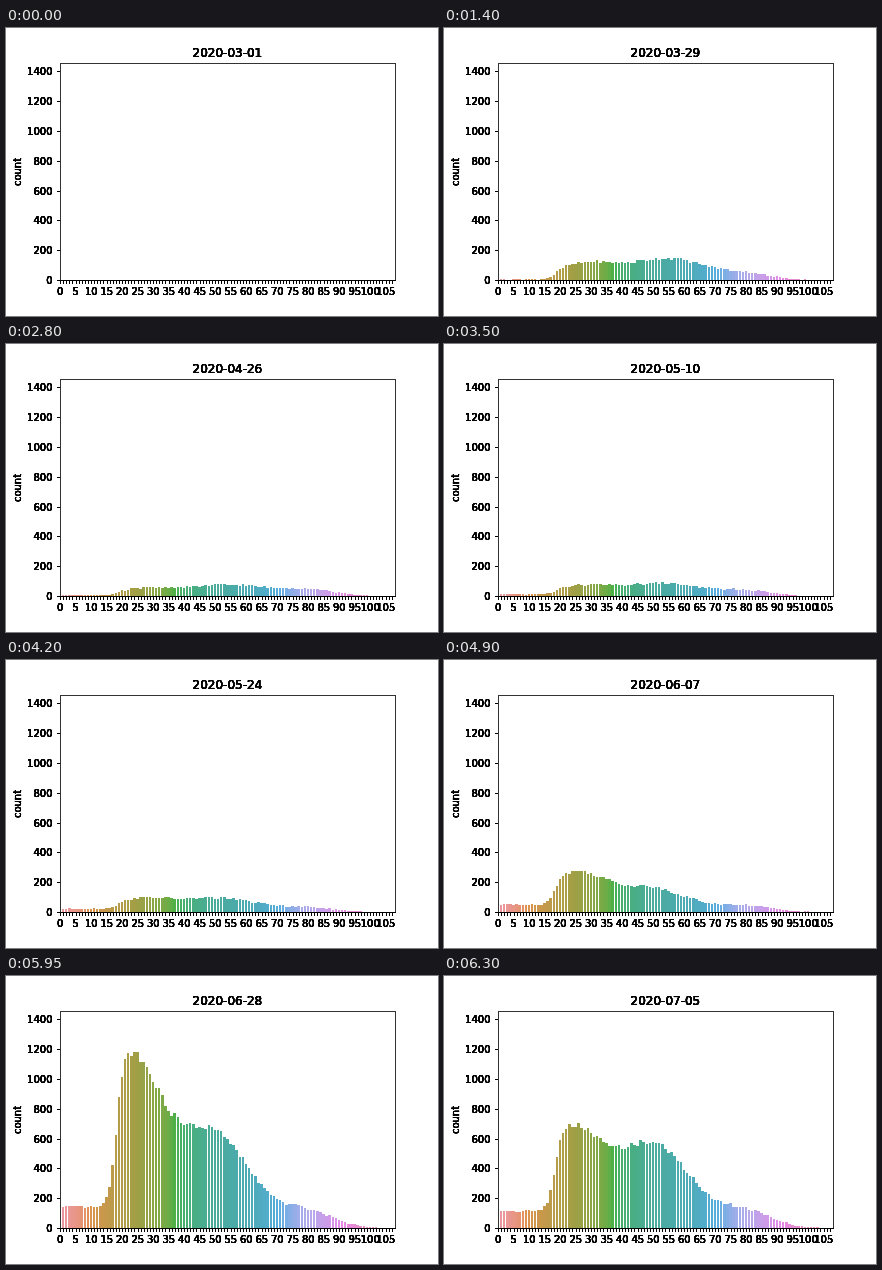
Write an HTML page that moves like this. It is 432 by 288 pixels and loops after 6.65 s.

```html
<!DOCTYPE html>
<html lang="en">
<head>
<meta charset="utf-8">
<title>Weekly count by age</title>
<style>
  html, body { margin: 0; width: 100%; height: 100%; overflow: hidden; background: #fff; }
  svg { display: block; width: 432px; height: 288px; }
  text {
    font: 10px "DejaVu Sans", sans-serif;
    text-anchor: middle;
    text-shadow: 0 0 #000, 0 0 #000, 0 0 #000, 0 0 #000;
    stroke: #000;
    stroke-width: .15px;
  }
  #title { font-size: 12px; }
  .right { text-anchor: end; }
</style>
</head>
<body>
<svg viewBox="0 0 432 288">
  <g id="bars" shape-rendering="crispEdges"></g>
  <g id="axes" shape-rendering="crispEdges"></g>
  <g id="labels">
    <text id="title" x="221.4" y="29"></text>
    <text transform="translate(15 144) rotate(-90)">count</text>
  </g>
</svg>
<script>
const STEP = 350, WEEKS = 19, AGES = 108;
const LEFT = 54, RIGHT = 388.8, TOP = 34.56, BASE = 252, Y_MAX = 1459;
const PITCH = (RIGHT - LEFT) / AGES;
const $ = id => document.getElementById(id);
const xOf = age => LEFT + age * PITCH;
const yOf = count => BASE - Math.min(count, Y_MAX) * (BASE - TOP) / Y_MAX;
const mix = (a, b, t) => a + (b - a) * t;
const bump = (x, center, width) => Math.exp(-(((x - center) / width) ** 2));
const rise = (x, center, width) => 1 / (1 + Math.exp((center - x) / width));

function add(parent, tag, attrs, text = '') {
  const el = document.createElementNS('http://www.w3.org/2000/svg', tag);
  for (const key in attrs) el.setAttribute(key, attrs[key]);
  el.textContent = text;
  return parent.appendChild(el);
}

// Key weeks: size of each age group, and where the two main groups peak
const keys = [
  { week: 0, kids: 5, young: 122, youngAge: 28, mid: 160, midAge: 55, old: 42 },
  { week: 4, kids: 5, young: 122, youngAge: 28, mid: 160, midAge: 55, old: 42 },
  { week: 8, kids: 7, young: 50, youngAge: 28, mid: 75, midAge: 55, old: 42 },
  { week: 12, kids: 22, young: 88, youngAge: 26, mid: 92, midAge: 52, old: 28 },
  { week: 14, kids: 50, young: 255, youngAge: 24, mid: 160, midAge: 49, old: 42 },
  { week: 16, kids: 135, young: 1400, youngAge: 21, mid: 590, midAge: 49, old: 110 },
  { week: 17, kids: 140, young: 1130, youngAge: 22, mid: 640, midAge: 49, old: 110 },
  { week: 18, kids: 115, young: 640, youngAge: 23, mid: 560, midAge: 50, old: 110 }
];

// Group sizes grow and shrink geometrically between key weeks
function groupsAt(week) {
  const i = Math.max(1, keys.findIndex(k => k.week >= week));
  const a = keys[i - 1], b = keys[i], t = (week - a.week) / (b.week - a.week);
  const out = {};
  for (const name in a) out[name] = a[name] ? a[name] * (b[name] / a[name]) ** t : 0;
  return out;
}

function noise(week, age) {
  const s = Math.sin(week * 78.233 + age * 12.9898) * 43758.5453;
  return (s - Math.floor(s)) * 2 - 1;
}

function countAt(groups, week, age) {
  const adult = rise(age, 17.8, 1.1);
  const grown = groups.young * bump(age, groups.youngAge, 14)
    + groups.mid * bump(age, groups.midAge, 17)
    + groups.old * bump(age, 80, 12);
  const mean = mix(groups.kids, grown, adult) * rise(week, 2.9, .53);
  return Math.max(0, mean + noise(week, age) * .8 * Math.sqrt(mean));
}

// Evenly spaced hues in HUSL space, partly desaturated
const M = [[3.2406, -1.5372, -.4986], [-.9689, 1.8758, .0415], [.0557, -.2040, 1.0570]];

function maxChroma(L, hue) {
  const s = ((L + 16) / 116) ** 3;
  let best = Infinity;
  for (const [a, b, c] of M) for (const t of [0, 1]) {
    const top1 = (284517 * a - 94839 * c) * s;
    const top2 = (838422 * c + 769860 * b + 731718 * a) * L * s - 769860 * t * L;
    const bottom = (632260 * c - 126452 * b) * s + 126452 * t;
    const len = top2 / bottom / (Math.sin(hue) - top1 / bottom * Math.cos(hue));
    if (len > 0) best = Math.min(best, len);
  }
  return best;
}

function barColor(i) {
  const L = 69.3, hue = ((i / AGES + .01) % 1) * 359 * Math.PI / 180;
  const C = maxChroma(L, hue) * .891;
  const u = C * Math.cos(hue) / (13 * L) + .19783;
  const v = C * Math.sin(hue) / (13 * L) + .46832;
  const Y = ((L + 16) / 116) ** 3, X = 9 * Y * u / (4 * v);
  const Z = (9 * Y - 15 * v * Y - v * X) / (3 * v);
  const rgb = M.map(([a, b, c]) => {
    const n = Math.min(1, Math.max(0, a * X + b * Y + c * Z));
    return n <= .0031308 ? 12.92 * n : 1.055 * n ** (1 / 2.4) - .055;
  });
  const mid = (Math.max(...rgb) + Math.min(...rgb)) / 2;
  return `rgb(${rgb.map(n => Math.round(mix(mid, n, .75) * 255))})`;
}

const bars = Array.from({ length: AGES }, (_, age) => {
  const x = Math.max(LEFT, Math.round(xOf(age) - .4 * PITCH));
  const width = Math.round(xOf(age) + .4 * PITCH) - x;
  return add($('bars'), 'rect', { x, width, fill: barColor(age) });
});

const box = (x, y, width, height, fill = '#000') =>
  add($('axes'), 'rect', { x, y, width, height, fill });
box(54, 35, 1, 218, '#333');
box(389, 35, 1, 218, '#333');
box(54, 35, 336, 1, '#333');
box(54, 252, 336, 1);
for (let age = 0; age < AGES; age++) {
  box(Math.round(xOf(age)), 253, 1, 3);
  if (age % 5 === 0) add($('labels'), 'text', { x: xOf(age) + .3, y: 267 }, age);
}
for (let n = 0; n <= 1400; n += 200) {
  const y = Math.round(yOf(n));
  box(51, y, 3, 1);
  add($('labels'), 'text', { x: 46.5, y: y + 4, class: 'right' }, n);
}

let shown = -1;
function draw(week) {
  const day = new Date(Date.UTC(2020, 2, 1 + 7 * week));
  $('title').textContent = day.toISOString().slice(0, 10);
  const groups = groupsAt(week);
  bars.forEach((bar, age) => {
    const y = Math.round(yOf(countAt(groups, week, age)));
    bar.setAttribute('y', y);
    bar.setAttribute('height', BASE - y);
  });
  shown = week;
}

function tick() {
  const week = Math.floor(performance.now() / STEP) % WEEKS;
  if (week !== shown) draw(week);
  requestAnimationFrame(tick);
}
tick();
</script>
</body>
</html>
```
